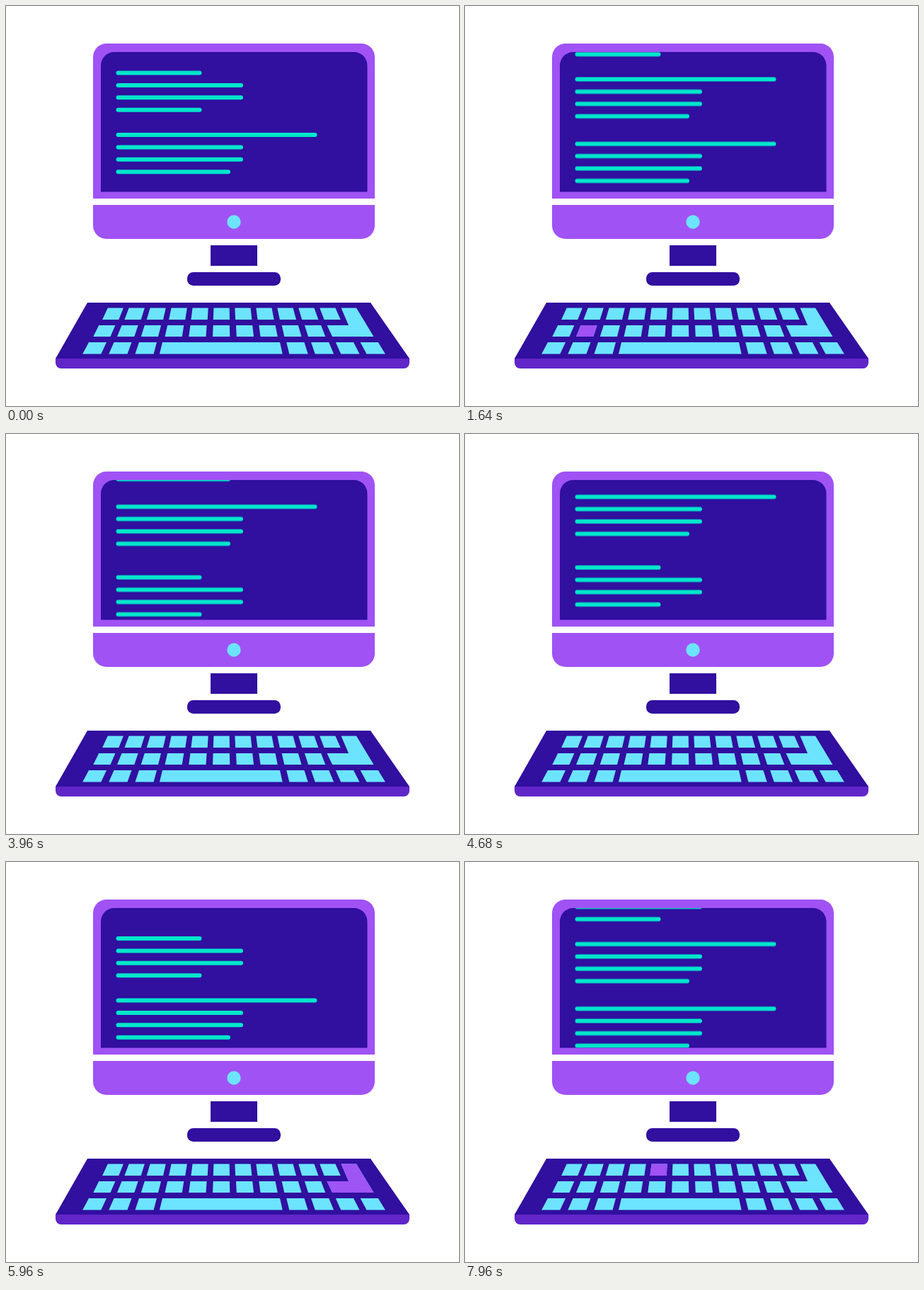
Recreate the animation shown at these times as an HTML page. Size 640 by 565 pixels, loop 8 s.

```html
<!DOCTYPE html>
<html lang="en">
<head>
<meta charset="utf-8">
<title>Computer typing</title>
<style>
  html, body { margin: 0; width: 100%; height: 100%; overflow: hidden; background: #fff; }
  svg { display: block; width: 100%; height: 100%; }
  .dark { fill: #310f9f; }
  .purple { fill: #a052f4; }
  .key { fill: #6ce4ff; }
  #code { stroke: #00e6cb; stroke-width: 6; stroke-linecap: round; }
</style>
</head>
<body>
<svg viewBox="0 0 640 565">
  <defs>
    <path id="glass" d="M134 262.500V84a19 19 0 0 1 19-19H491.500a19 19 0 0 1 19 19V262.500Z"/>
    <clipPath id="screen"><use href="#glass"/></clipPath>
  </defs>
  <path class="purple" d="M123 272V72a19 19 0 0 1 19-19H502a19 19 0 0 1 19 19V272Z"/>
  <use href="#glass" class="dark"/>
  <g clip-path="url(#screen)"><g id="code"></g></g>
  <path class="purple" d="M123 281H521V310a19 19 0 0 1-19 19H142a19 19 0 0 1-19-19Z"/>
  <circle class="key" cx="322" cy="305" r="9.700"/>
  <rect class="dark" x="289" y="338" width="66" height="29"/>
  <rect class="dark" x="256" y="376" width="132" height="19" rx="8.500"/>
  <path fill="#6026c8" d="M70 497.500H570V504a8 8 0 0 1-8 8H78a8 8 0 0 1-8-8Z"/>
  <path class="dark" d="M115 419H515L570 498H70Z"/>
  <g id="keys"></g>
</svg>
<script>
const LOOP = 8000;
const code = document.getElementById('code');
const keyboard = document.getElementById('keys');

function add(parent, tag, attrs) {
  const el = document.createElementNS('http://www.w3.org/2000/svg', tag);
  for (const name in attrs) el.setAttribute(name, attrs[name]);
  return parent.appendChild(el);
}

// steps: [time in ms, value]; the last value holds until the loop ends
function play(el, steps, easing, toStyle) {
  const last = steps[steps.length - 1][1];
  const frames = [...steps, [LOOP, last]].map(([time, value]) =>
    ({ offset: Math.min(time / LOOP, 1), easing, ...toStyle(value) }));
  el.animate(frames, { duration: LOOP, iterations: Infinity });
}

// Code blocks repeat down the page: one narrow block, then two wide ones
const PAGE = 278.5, LINE = 17.4;
function addBlock(top, ends) {
  ends.forEach((x2, i) => {
    const y = top + i * LINE;
    add(code, 'line', { x1: 158.5, x2, y1: y, y2: y });
  });
}
for (let top = 94.5; top < 3 * PAGE; top += PAGE) {
  addBlock(top, [273.5, 332, 332, 273.5]);
  addBlock(top + 87.5, [436.5, 332, 332, 314]);
  addBlock(top + 178.7, [436.5, 332, 332, 314]);
}

// Each turn scrolls in two bursts with slow drifts between them
const TURN = 4000, RISE = 174;
const burst = [[0, 0], [840, 11.3], [1240, 73.3], [1640, 78.5], [2840, 163], [3960, 170.5]];
const scroll = [0, 1].flatMap(n => burst.map(([t, y]) => [t + n * TURN, y + n * RISE]));
play(code, scroll, 'ease-in-out', y => ({ transform: `translateY(${-y}px)` }));

const keys = {};
function addKey(name, points) {
  keys[name] = points;
  add(keyboard, 'polygon', { class: 'key', points });
}

// Side edges lean outwards in proportion to their distance from the middle
function addRow(name, count, y, height, x, gap, width) {
  const lean = edge => edge + (edge - 308) * 0.0028 * height;
  for (let i = 0; i < count; i++) {
    const left = x + gap * i, right = left + width, bottom = y + height;
    addKey(name + (i + 1),
      `${left},${y} ${right},${y} ${lean(right)},${bottom} ${lean(left)},${bottom}`);
  }
}
addRow('top', 11, 426.5, 16.5, 143.7, 29.95, 22.2);
addRow('mid', 10, 451, 16, 131.2, 32.3, 23.2);
addRow('left', 3, 475, 16.5, 117, 35.5, 25);
addRow('space', 1, 475, 16.5, 221, 0, 166);
addRow('right', 4, 475, 16.5, 396.2, 34.8, 25.2);
addKey('enter', '473.5,426.5 495,426.5 519.5,467 461,467 453.5,451 484,451');

// One press per beat; "+" joins keys pressed together
const BEAT = 520;
const typing = 'top11 mid5 mid9 mid2 left1 top9+top11 left1 top6 top4 top11 top5 enter mid2 mid9 right2+left1 top5';
typing.split(' ').forEach((chord, beat) => {
  const t = beat * BEAT;
  for (const name of chord.split('+')) {
    const glow = add(keyboard, 'polygon', { class: 'purple', points: keys[name], opacity: 0 });
    const press = [[0, 0], [t, 0], [t + 80, 1], [t + 240, 1], [t + 320, 0]];
    play(glow, press.filter(([time]) => time <= LOOP), 'linear', opacity => ({ opacity }));
  }
});
</script>
</body>
</html>
```
